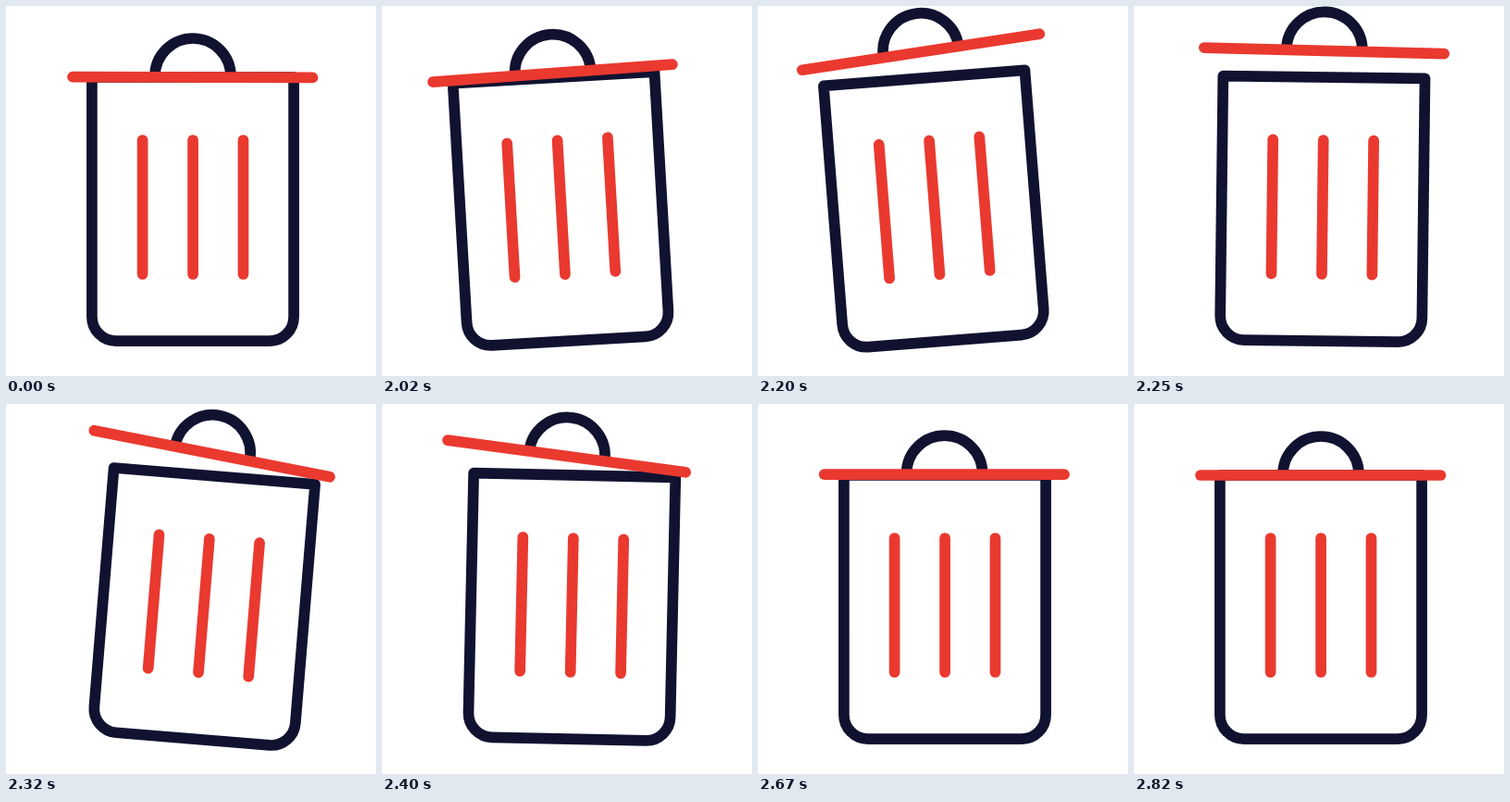
An HTML page that plays this animation: 400 by 400 pixels, repeating every 2.85 s.

```html
<!DOCTYPE html>
<html lang="en">
<head>
<meta charset="utf-8">
<title>Bin</title>
<style>
  html, body { margin: 0; width: 100%; height: 100%; overflow: hidden; background: #fff; }
  svg { display: block; width: 100%; height: 100%; }
  path { fill: none; stroke-width: 11.7; stroke-linecap: round; stroke-linejoin: round; }
  .dark { stroke: #101230; }
  .red { stroke: #ea392f; }
  .flat { stroke-linecap: butt; }
</style>
</head>
<body>
<svg viewBox="0 0 400 400">
  <g id="bin">
    <path class="dark" d="M92.9 77H311.1V336A26 26 0 0 1 285.1 362.1H118.9A26 26 0 0 1 92.9 336Z"/>
    <path class="red" d="M147.6 145V290M202.1 145V290M256.5 145V290"/>
    <g id="lid">
      <path class="dark flat" d="M161 76A41 41 0 0 1 243 76"/>
      <path class="red" d="M72 77H331.5"/>
    </g>
  </g>
</svg>
<script>
const LOOP = 2850, START = 2000, STEP = 25;

const sineOut = u => Math.sin(u * Math.PI / 2);
const sineInOut = u => (1 - Math.cos(u * Math.PI)) / 2;
const cubicOut = u => 1 - (1 - u) ** 3;

// Chains eased legs, each ending at [ms after START, value, easing]
function chain(first, ...legs) {
  return t => {
    let from = 0, value = first;
    for (const [end, goal, ease] of legs) {
      if (t < end) return value + (goal - value) * ease(Math.max(0, t - from) / (end - from));
      from = end;
      value = goal;
    }
    return value;
  };
}

// Angles are clockwise; lid motion is relative to the bin
const binTilt = chain(0, [113, -9.7, sineOut], [325, 4.7, sineInOut], [535, 0, cubicOut]);
const lidTilt = chain(0.2, [110, -8.7, sineInOut], [360, 7.2, sineInOut], [550, 0, sineInOut]);
const lidX = chain(0, [105, -4.4, sineInOut], [250, 0, sineInOut],
  [400, -8.8, sineInOut], [825, 0, cubicOut]);
const lidY = chain(0, [230, -29, sineOut], [400, -20.4, sineInOut], [825, 0, cubicOut]);

const bin = document.getElementById("bin");
const lid = document.getElementById("lid");

// Poses advance every 25 ms, shown from the nearest lower 10 ms
function poseTime(ms) {
  const tick = Math.floor(ms / 10) * 10;
  return Math.floor((tick + 5) / STEP) * STEP - START;
}

function draw(now) {
  const t = poseTime(now % LOOP);
  bin.setAttribute("transform", `rotate(${binTilt(t)} 202 362)`);
  lid.setAttribute("transform",
    `translate(${lidX(t)} ${lidY(t)}) rotate(${lidTilt(t)} 202 77)`);
}

const begin = performance.now();
function loop() {
  draw(performance.now() - begin);
  requestAnimationFrame(loop);
}
loop();
</script>
</body>
</html>
```
